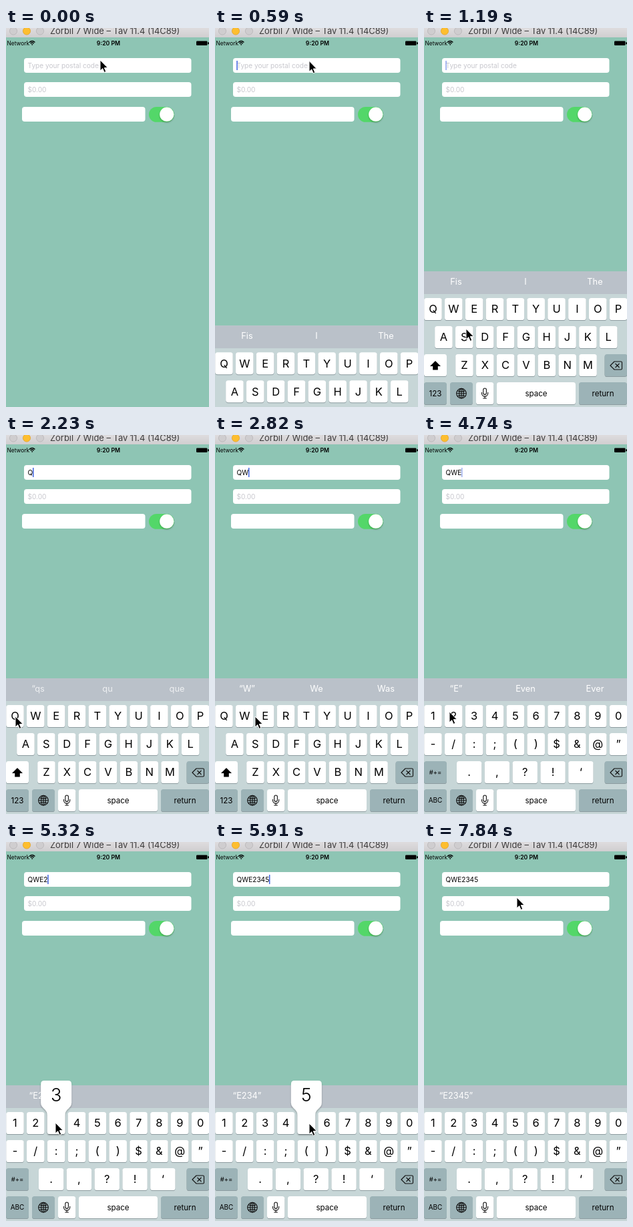
Write an HTML page that moves like this. It is 304 by 567 pixels and loops after 7.99 s.

```html
<!DOCTYPE html>
<html lang="en">
<head>
<meta charset="utf-8">
<title>Postal code form</title>
<style>
html, body { margin: 0; height: 100%; overflow: hidden; background: #8ec5b4; }
svg { display: block; width: 100vw; height: 100vh; font-family: Inter, "Open Sans", sans-serif; }
text { white-space: pre; }
.mid { text-anchor: middle; }
</style>
</head>
<body>
<svg id="stage" viewBox="0 0 304 567">
  <defs>
    <linearGradient id="chrome" x2="0" y2="1">
      <stop offset="0" stop-color="#dedcde"/><stop offset="1" stop-color="#d0ced0"/>
    </linearGradient>
    <filter id="soft" x="-30%" y="-30%" width="160%" height="170%">
      <feDropShadow dx="0" dy="1.5" stdDeviation="1.2" flood-opacity=".3"/>
    </filter>
  </defs>
  <rect width="304" height="567" fill="#8ec5b4"/>

  <rect width="304" height="14" fill="url(#chrome)"/>
  <g stroke-width=".8">
    <circle cx="11" cy="4.5" r="5.6" fill="#cfcdcf" stroke="#b5b3b5"/>
    <circle cx="31" cy="4.5" r="5.6" fill="#fdbe2f" stroke="#e0a22c"/>
    <circle cx="51" cy="4.5" r="5.6" fill="#cfcdcf" stroke="#b5b3b5"/>
  </g>
  <text x="66" y="9" font-size="12.9" fill="#3c3b3c">Zorbil 7 Wide – Tav 11.4 (14C89)</text>

  <text x="1.5" y="26" font-size="8.4">Network</text>
  <g fill="none" stroke="#000" stroke-width="1.4">
    <path d="M35 21.4Q39.2 17.6 43.4 21.4M36.7 23.2Q39.2 20.9 41.7 23.2"/>
    <path d="M39.2 26L37.9 24.6Q39.2 23.6 40.5 24.6Z" fill="#000" stroke="none"/>
  </g>
  <text class="mid" x="153.5" y="26" font-size="8.7" font-weight="600">9:20 PM</text>
  <rect x="285" y="19.5" width="16.5" height="6.5" rx="1.2"/>
  <rect x="302.3" y="21.3" width="1.7" height="3"/>

  <g fill="#fff">
    <rect x="27" y="45" width="250.5" height="22" rx="4"/>
    <rect x="27" y="81" width="250.5" height="22" rx="4"/>
    <rect x="24" y="118" width="184.5" height="22" rx="4"/>
  </g>
  <text id="hint" x="32.5" y="59.7" font-size="10.1" fill="#c7c7cd">Type your postal code</text>
  <text x="32.5" y="95.7" font-size="10.1" fill="#c7c7cd">$0.00</text>
  <text id="typed" x="32.5" y="59.7" font-size="10.1"></text>
  <rect id="caret" y="49" width="1.5" height="14" fill="#3f63e0"/>

  <rect x="214" y="118" width="37.8" height="22.8" rx="11.4" fill="#53d769"/>
  <circle cx="240.8" cy="129.2" r="10.6" fill="#fff" filter="url(#soft)"/>

  <g id="board">
    <rect y="364" width="304" height="203" fill="#c7d6d7"/>
    <rect y="364" width="304" height="34" fill="#bac1c9"/>
    <g id="words" class="mid" font-size="12.8" fill="#fff"></g>
    <g id="common"></g>
    <g id="letters"></g>
    <g id="digits"></g>
    <g id="popup" filter="url(#soft)">
      <path id="bubble" fill="#fff"/>
      <text id="big" class="mid" y="388" font-size="27" font-weight="300"></text>
    </g>
  </g>
  <path id="cursor" d="M0 0V16L3.7 12.6 6.2 18.4 8.8 17.3 6.3 11.6H11.3Z" stroke="#fff" stroke-width="1" stroke-linejoin="round"/>
</svg>
<script>
const LOOP = 7990, PITCH = 30.85;
const $ = id => document.getElementById(id);
const add = (id, markup) => $(id).insertAdjacentHTML('beforeend', markup);

const SHORT = [11, 15, 18, 22, 26, 30, 34, 35, 38, 49];
const stepTime = k => 440 + 150 * k - 10 * SHORT.filter(s => s <= k).length;

// [step, value]: each value holds until the next one.
const TYPED = [[-1, ''], [12, 'Q'], [15, 'QW'], [18, 'QWE'], [31, 'QWE2'],
  [33, 'QWE23'], [35, 'QWE234'], [37, 'QWE2345']];
const WORDS = [[-1, 'Fis|I|The'], [12, '“qs|qu|que'], [13, '“Q”|Qu|Que'], [15, '“W”|We|Was'],
  [18, '“E”|Even|Ever'], [31, '“E2”'], [33, '“E23”'], [35, '“E234”'], [38, '“E2345”']];
const CARET = [[-1, 0], [0, 1], [5, .6], [6, 0], [7, .5], [8, 1], [23, .5], [24, 0], [26, .5],
  [27, 1], [29, .5], [30, 0], [31, 1], [47, .5], [48, 0]];
const POPUP = [[-1, ''], [11, 'Q'], [12, ''], [14, 'W'], [15, ''], [17, 'E'], [18, ''], [30, '2'],
  [31, ''], [32, '3'], [33, ''], [34, '4'], [35, ''], [36, '5'], [38, '']];
const SLIDE = [[-1, 0], [1, .6], [2, 1]];
const NUMERIC = [[-1, false], [24, true]];

// [step, x, y]: pointer path, linear between points.
const PATH = [[-1, 141, 48], [2, 141, 50], [3, 120, 160], [4, 82, 360], [5, 63, 450], [6, 50, 449],
  [9, 14, 421], [12, 14, 421], [14, 44, 421], [15, 46, 421], [17, 74, 421], [18, 75, 421],
  [19, 72, 440], [21, 49, 522], [22, 24, 537], [24, 18, 537], [26, 23, 510], [28, 35, 430],
  [29, 38, 414], [30, 40, 418], [32, 74, 420], [34, 106, 421], [36, 139, 421], [37, 141, 421],
  [40, 164, 421], [45, 164, 421], [47, 157, 330], [49, 141, 98], [50, 139, 83]];

const hold = (list, k) => list.findLast(e => e[0] <= k)[1];

function pointer(k) {
  const i = PATH.findLastIndex(p => p[0] <= k);
  const a = PATH[i], b = PATH[i + 1] || a;
  const u = b === a ? 0 : (k - a[0]) / (b[0] - a[0]);
  return [a[1] + (b[1] - a[1]) * u, a[2] + (b[2] - a[2]) * u];
}

function key(id, x, y, w, label = '', size = 16.5, fill = '#fff') {
  add(id, `<rect x="${x}" y="${y + 1}" width="${w}" height="33" rx="3.6" fill="#8d9ca0"/>
    <rect x="${x}" y="${y}" width="${w}" height="33" rx="3.6" fill="${fill}"/>
    <text class="mid" x="${x + w / 2}" y="${y + 16.5 + size * .36}" font-size="${size}">${label}</text>`);
}

function row(id, chars, x, y, w = 26.5, pitch = PITCH) {
  [...chars].forEach((c, i) => key(id, x + i * pitch, y, w, c === '&' ? '&amp;' : c));
}

function buildBoard() {
  const dark = '#9cb3b7';
  row('letters', 'QWERTYUIOP', .2, 404);
  row('letters', 'ASDFGHJKL', 16.2, 446);
  key('letters', 0, 488, 34);
  row('letters', 'ZXCVBNM', 47.2, 488);
  key('letters', 0, 530, 34, '123', 11.7, dark);
  add('letters', '<path d="M17 498L25 506H20.8V511.5H13.2V506H9Z"/>');

  row('digits', '1234567890', .2, 404);
  row('digits', '-/:;()$&@”', .2, 446);
  key('digits', 0, 488, 34, '#+=', 9.5, dark);
  row('digits', '.,?!‘', 49, 488, 37.3, 41.8);
  key('digits', 0, 530, 34, 'ABC', 10, dark);

  key('common', 270.5, 488, 34, '', 0, dark);
  key('common', 39, 530, 34, '', 0, dark);
  key('common', 78, 530, 26.3);
  key('common', 109, 530, 118, 'space', 11.6);
  key('common', 232, 530, 72, 'return', 11.6, dark);
  add('common', `<g fill="none" stroke="#111" stroke-width="1.1" stroke-linejoin="round">
    <path d="M279 505L285 499H295Q296.5 499 296.5 500.5V509.5Q296.5 511 295 511H285ZM286.5 502L292.5 508M292.5 502L286.5 508"/>
    <circle cx="56" cy="546.7" r="7.3"/><ellipse cx="56" cy="546.7" rx="3.4" ry="7.3"/>
    <path d="M56 539.4V554M48.7 546.7H63.3M50.2 542.7Q56 545 61.8 542.7M50.2 550.7Q56 548.4 61.8 550.7"/>
    <rect x="88.8" y="539" width="4.6" height="9.4" rx="2.3"/>
    <path d="M86.5 545V546.5A4.6 4.6 0 0 0 95.7 546.5V545M91.1 551.2V554M88.3 554H93.9"/></g>`);

  for (const x of [48, 152, 256]) add('words', `<text x="${x}" y="384"></text>`);
}

function drawPopup(char) {
  $('popup').style.display = char ? '' : 'none';
  if (!char) return;
  const col = 'QWE'.includes(char) ? 'QWE'.indexOf(char) : char - 1;
  const l = .2 + col * PITCH, r = l + 26.5;
  const L = Math.max(0, l - 9.7), R = r + 9.7;
  $('bubble').setAttribute('d', `M${L + 5} 357H${R - 5}Q${R} 357 ${R} 362V390
    C${R} 399 ${r} 399 ${r} 408V433.5Q${r} 437 ${r - 3.5} 437H${l + 3.5}Q${l} 437 ${l} 433.5V408
    C${l} 399 ${L} 399 ${L} 390V362Q${L} 357 ${L + 5} 357Z`);
  $('big').setAttribute('x', (L + R) / 2);
  $('big').textContent = char;
}

function draw(t) {
  let k = -1;
  while (k < 50 && stepTime(k + 1) <= t) k++;

  const typed = hold(TYPED, k);
  $('typed').textContent = typed;
  $('hint').style.display = typed ? 'none' : '';
  $('caret').setAttribute('x', 32.3 + (typed ? $('typed').getComputedTextLength() : 0));
  $('caret').setAttribute('opacity', hold(CARET, k));

  const numeric = hold(NUMERIC, k), words = hold(WORDS, k).split('|');
  $('letters').style.display = numeric ? 'none' : '';
  $('digits').style.display = numeric ? '' : 'none';
  [...$('words').children].forEach((el, i) => el.textContent = words[i] || '');
  $('words').setAttribute('opacity', k === 12 ? .75 : 1);
  $('board').setAttribute('transform', `translate(0 ${203 * (1 - hold(SLIDE, k))})`);

  drawPopup(hold(POPUP, k));
  $('cursor').setAttribute('transform', `translate(${pointer(k)})`);
}

buildBoard();
const start = performance.now();
function tick() {
  draw((performance.now() - start) % LOOP);
  requestAnimationFrame(tick);
}
tick();
</script>
</body>
</html>
```
